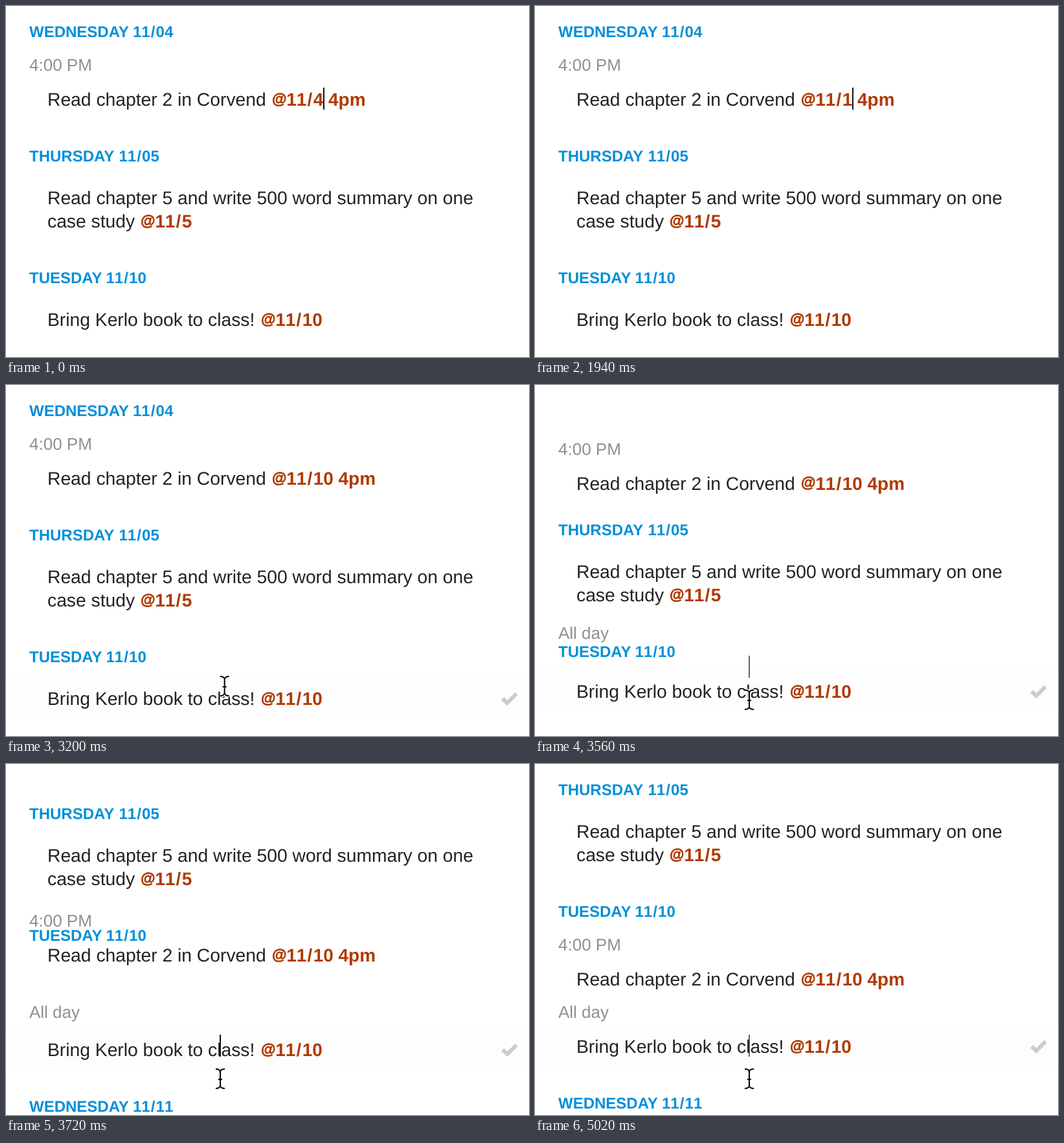
Recreate the animation shown at these times as an HTML page. Size 808 px wide and 542 px high, loop 5040 ms.

```html
<!DOCTYPE html>
<html lang="en">
<head>
<meta charset="utf-8">
<title>Agenda</title>
<style>
  html, body { margin: 0; width: 100%; height: 100%; overflow: hidden; background: #fff; }
  svg {
    position: absolute; left: 0; top: 0; width: 808px; height: 542px;
    font-family: "Liberation Sans", Arial, Helvetica, sans-serif;
    text-rendering: geometricPrecision;
  }
  .day { font-size: 24px; font-weight: bold; fill: #008fd9; }
  .time { font-size: 26px; fill: #8f8f8f; }
  .note { font-size: 28.25px; fill: #222; }
  .tag { font-size: 28px; font-weight: bold; fill: #b03a00; }
  .at { font-size: 23px; stroke: #b03a00; stroke-width: .8; }
  .num { font-kerning: none; }
  .check { fill: none; stroke: #ccc; stroke-width: 6; }
  .beam { fill: none; stroke: #000; stroke-width: 2; }
  .halo { stroke: #fff; stroke-width: 5; stroke-linejoin: round; }
</style>
</head>
<body>
<svg id="stage" viewBox="0 0 808 542"></svg>
<script>
const LOOP = 5040;
const MOVE = 360;
const stage = document.getElementById('stage');

function add(parent, name, attrs = {}, text = '') {
  const el = document.createElementNS('http://www.w3.org/2000/svg', name);
  for (const key in attrs) el.setAttribute(key, attrs[key]);
  el.textContent = text;
  parent.appendChild(el);
  return el;
}

const group = (parent = stage) => add(parent, 'g');
const label = (parent, cls, x, y, text) => add(parent, 'text', { class: cls, x, y }, text);

// Writes "11/xx" with a little air around the slash; returns the part after it.
function date(text, tail, gap) {
  add(text, 'tspan', {}, '11');
  add(text, 'tspan', { dx: gap }, '/');
  return add(text, 'tspan', { dx: gap }, tail);
}

function heading(parent, y, name, x, tail) {
  label(parent, 'day', 36, y, name);
  date(label(parent, 'day num', x, y, ''), tail, 1.1);
}

function tag(parent, x, y, tail) {
  label(parent, 'tag at', x, y - 3.5, '@');
  return date(label(parent, 'tag num', x + 22.2, y, ''), tail, 1.25);
}

// Content
const hover = add(stage, 'rect', { y: 453, width: 808, height: 63, fill: '#fdfdfd' });

const oldDay = group();
heading(oldDay, 48, 'WEDNESDAY', 196, '04');

const days = group();
heading(days, 240, 'THURSDAY', 174.5, '05');
label(days, 'note', 64, 306, 'Read chapter 5 and write 500 word summary on one');
label(days, 'note', 64, 342, 'case study');
tag(days, 208, 342, '5');
heading(days, 428, 'TUESDAY', 154.5, '10');

const reading = group();
label(reading, 'time', 36, 100, '4:00 PM');
label(reading, 'note', 64, 154, 'Read chapter 2 in Corvend');
const due = tag(reading, 411, 154, '4 4pm');

const allDay = label(stage, 'time', 36, 392, 'All day');

const book = group();
label(book, 'note', 64, 494, 'Bring Kerlo book to class!');
tag(book, 394, 494, '10');
heading(book, 580, 'WEDNESDAY', 196, '11');
const check = add(book, 'polyline', {
  class: 'check', points: '767.3,484 774.4,491 788.7,476.7'
});

const caret = add(stage, 'rect', { width: 2, height: 34, fill: '#111' });

const mouse = group();
const beam = 'M-7-15Q-1-15 0-11Q1-15 7-15M0-11V11M-7 15Q-1 15 0 11Q1 15 7 15M-3 1H3';
add(mouse, 'path', { class: 'beam halo', d: beam });
add(mouse, 'path', { class: 'beam', d: beam });

// Timeline
const typing = [[0, '4'], [1560, ''], [1820, '1'], [2040, '10']];
const carets = [
  [0, 490, 126], [1560, 474, 126], [1820, 490, 126],
  [2040, 506, 126], [3400, 330, 467], [3500, 330, 418]
];
const blink = [
  [0, 1], [600, 1], [680, 0], [1020, 0], [1100, 1], [2740, 1], [2840, 0], [3400, 0],
  [3410, .65], [3580, .65], [3600, 1], [4200, 1], [4280, 0], [4900, 0], [5030, .7]
];
const path = [[2680, 440, 212], [2780, 419, 264], [3220, 334, 474], [3340, 331, 486]];

const last = (steps, t) => steps.filter(s => s[0] <= t).pop();

function between(steps, t, col) {
  const i = steps.findIndex(s => s[0] > t);
  if (i < 0) return steps[steps.length - 1][col];
  if (i === 0) return steps[0][col];
  const a = steps[i - 1], b = steps[i];
  return a[col] + (b[col] - a[col]) * (t - a[0]) / (b[0] - a[0]);
}

// cubic-bezier(.25, .1, .25, 1)
function ease(x) {
  if (x <= 0) return 0;
  if (x >= 1) return 1;
  let lo = 0, hi = 1, s = .5;
  for (let i = 0; i < 24; i++) {
    s = (lo + hi) / 2;
    if (.75 * s * (1 - s) + s ** 3 < x) lo = s; else hi = s;
  }
  return .3 * s * (1 - s) ** 2 + 3 * s * s * (1 - s) + s ** 3;
}

const show = (el, on) => el.setAttribute('visibility', on ? 'visible' : 'hidden');
const place = (el, x, y) => el.setAttribute('transform', `translate(${x} ${y})`);

function draw(t) {
  const sorted = t >= 3500;
  const p = ease((t - 3540) / MOVE);
  const lift = -48 * ease((t - 3500) / MOVE);
  place(days, 0, -192 * p);
  place(reading, 0, 188 * p);
  place(book, 0, lift);
  place(hover, 0, lift);
  show(oldDay, !sorted);
  show(allDay, sorted);

  const tail = last(typing, t)[1] + ' 4pm';
  if (due.textContent !== tail) due.textContent = tail;

  const [, cx, cy] = last(carets, t);
  caret.setAttribute('x', cx);
  caret.setAttribute('y', cy);
  caret.setAttribute('opacity', between(blink, t, 1));

  const my = between(path, t, 2);
  place(mouse, between(path, t, 1), my);
  show(mouse, t >= path[0][0]);
  show(check, my > 455);
  show(hover, my > 455);
}

const start = performance.now();
function tick() {
  draw((performance.now() - start) % LOOP);
  requestAnimationFrame(tick);
}
draw(0);
requestAnimationFrame(tick);
</script>
</body>
</html>
```
